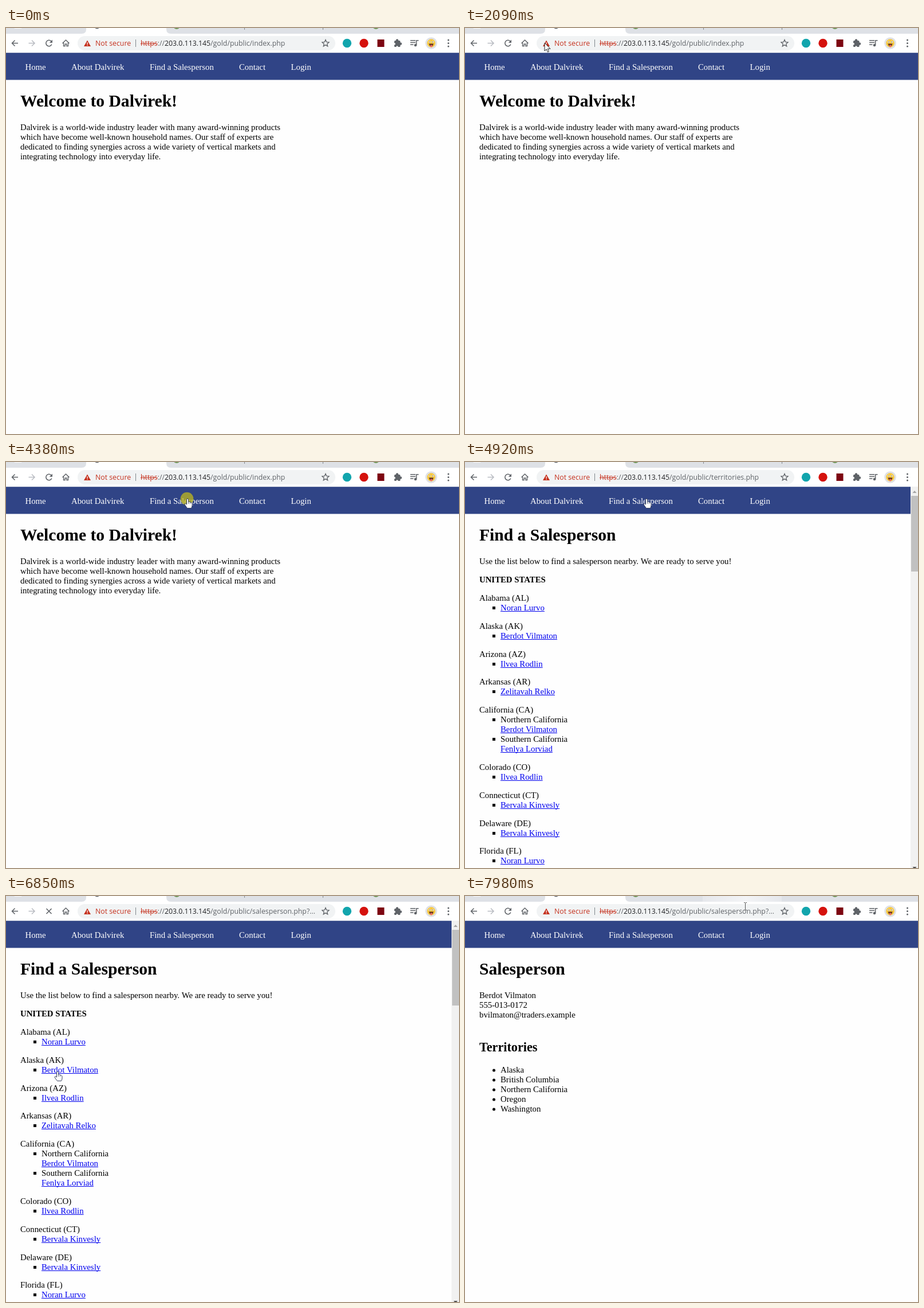
These frames come from a looping animation (791 px wide and 708 px high, 8 s). An HTML page with a canvas:

```html
<!DOCTYPE html>
<html lang="en">
<head>
<meta charset="utf-8">
<title>Salesperson pages</title>
<style>
html, body { margin: 0; width: 100%; height: 100%; overflow: hidden; background: #fefefe; }
canvas { display: block; width: 791px; height: 708px; }
</style>
</head>
<body>
<canvas id="stage" width="791" height="708"></canvas>
<script>
const c = document.getElementById('stage').getContext('2d');
const LOOP = 8000, W = 791, H = 708, EM = 14.8;
const SERIF = '"Liberation Serif", serif', SANS = '"Open Sans", sans-serif';
const GREY = '#5f6368', RED = '#c5321f', BLUE = '#0000ee';

const [noran, berdot, ilvea, zeli, fenlya, bervala] = [
  'Noran Lurvo', 'Berdot Vilmaton', 'Ilvea Rodlin',
  'Zelitavah Relko', 'Fenlya Lorviad', 'Bervala Kinvesly'];
const states = [
  ['Alabama (AL)', noran], ['Alaska (AK)', berdot], ['Arizona (AZ)', ilvea],
  ['Arkansas (AR)', zeli],
  ['California (CA)', ['Northern California', berdot], ['Southern California', fenlya]],
  ['Colorado (CO)', ilvea], ['Connecticut (CT)', bervala],
  ['Delaware (DE)', bervala], ['Florida (FL)', noran]];

// Pointer moves: start, end, step count, then [step, x, y] key points.
const moves = [
  [520, 660, 3, [[0, 770, 692], [1, 763, 691], [2, 800, 715]]],
  [1320, 2090, 12, [[0, 776, 690], [1, 600, 490], [2, 400, 290], [3, 253, 164],
    [5, 180, 96], [8, 148, 48], [11, 139, 26]]],
  [2160, 2570, 7, [[0, 260, 28], [2, 550, 46], [3, 467, 53], [4, 382, 67], [6, 317, 64]]],
  [5390, 5530, 3, [[0, 170, 130], [1, 12, 198], [2, -30, 215]]],
  [5730, 6250, 9, [[0, 30, 250], [3, 78, 282], [5, 91, 293], [8, 90, 306]]],
  [7300, 7980, 11, [[0, 104, 292], [4, 240, 176], [8, 444, 42], [9, 480, 8], [10, 489, 18]]]];

const during = (t, a, b) => t >= a && t < b;
const pageAt = t => t < 4920 ? 'home' : t < 6980 ? 'list' : 'person';

function text(s, x, y, size = EM, color = '#000', family = SERIF, weight = '') {
  c.font = `${weight} ${size}px ${family}`;
  c.fillStyle = color;
  c.fillText(s, x, y);
  return c.measureText(s).width;
}
function rect(x, y, w, h, color) {
  c.fillStyle = color;
  c.fillRect(x, y, w, h);
}
function disc(x, y, r, color) {
  c.fillStyle = color;
  c.beginPath();
  c.arc(x, y, r, 0, 7);
  c.fill();
}
function pill(x, y, w, h, r, color) {
  c.fillStyle = color;
  c.beginPath();
  c.roundRect(x, y, w, h, r);
  c.fill();
}
function shape(d, x, y, fill, stroke, width = 1.5) {
  const p = new Path2D(d);
  c.save();
  c.translate(x, y);
  if (fill) { c.fillStyle = fill; c.fill(p); }
  if (stroke) { c.strokeStyle = stroke; c.lineWidth = width; c.stroke(p); }
  c.restore();
}
function link(s, x, y, color = BLUE) {
  const w = text(s, x, y, EM, color);
  rect(x, Math.round(y) + 1, w, 1, color);
}
const heading = s => text(s, 25, 137, EM * 2, '#000', SERIF, 'bold');
const lines = (list, y) => list.forEach((s, i) => text(s, 25, y + i * 17));

function tabs(t) {
  rect(0, 0, W, 10, '#dee1e6');
  if (t >= 7880) {
    const g = c.createLinearGradient(415, 0, 553, 0);
    g.addColorStop(0, '#e6e8ec');
    g.addColorStop(0.55, '#f3f4f6');
    g.addColorStop(1, '#e6e8ec');
    rect(415, 0, 138, 10, g);
  }
  shape('M132 10Q140 10 140 2V0H280V2Q280 10 288 10Z', 0, 0, '#fff');
  pill(14, -4, 14, 5, 2, '#fafafa');
  disc(159, -4, 5.5, GREY);
  disc(298, -4, 6, '#6f9455');
  disc(646, -4, 6, '#6f9455');
  if (t < 7880) {
    rect(416, 0, 1, 3, '#80868b');
    rect(553, 0, 1, 3, '#80868b');
  }
}

function toolbar(t) {
  rect(0, 10, W, 33, '#fff');
  const arrow = 'M5.5 0H-5M0 -5L-5 0L0 5';
  shape(arrow, 15.5, 26.5, null, GREY);
  c.save();
  c.translate(45, 26.5);
  c.scale(-1, 1);
  shape(arrow, 0, 0, null, '#b9bcc2');
  c.restore();
  if (during(t, 4510, 4920) || during(t, 6710, 6980)) {
    shape('M-4.5 -4.5L4.5 4.5M4.5 -4.5L-4.5 4.5', 75, 26.5, null, GREY, 1.6);
  } else {
    shape('M4.8 2A5.2 5.2 0 1 1 3.6 -3.8', 75, 26.5, null, GREY, 1.6);
    shape('M6 -6V-.8H.8Z', 75, 26.5, GREY);
  }
  shape('M-6 .2L0 -5.5L6 .2M-4 -1V5H-1.4V1.5H1.4V5H4V-1', 104.5, 26.5, null, GREY, 1.4);

  pill(125, 14, 450, 25, 12.5, '#f1f3f4');
  shape('M0 -5.5L6 5H-6Z', 142, 27, RED);
  rect(141.4, 25, 1.3, 3.6, '#fff');
  rect(141.4, 29.5, 1.3, 1.3, '#fff');
  text('Not secure', 156, 31, 12.3, RED, SANS);
  rect(226, 20, 1, 13, '#80868b');
  let x = 235;
  const w = text('https', x, 31, 12.3, RED, SANS);
  rect(x, 27, w, 1, RED);
  x += w;
  x += text('://', x, 31, 12.3, GREY, SANS);
  x += text('203.0.113.145', x, 31, 12.3, '#202124', SANS);
  const file = t < 4780 ? 'index.php' : t < 6850 ? 'territories.php' : 'salesperson.php?...';
  text('/gold/public/' + file, x, 31, 12.3, GREY, SANS);
  shape('M0 -6L1.7 -2L6 -1.6L2.7 1.2L3.7 5.4L0 3.1L-3.7 5.4L-2.7 1.2L-6 -1.6L-1.7 -2Z',
    558, 26.5, null, GREY, 1.3);

  disc(595.5, 26.5, 7.7, '#12a5ad');
  disc(625, 26.5, 7.7, '#d5120d');
  rect(648.5, 20, 12, 13, '#7d0712');
  pill(678, 22, 10.5, 11, 1.5, GREY);
  disc(683, 21.5, 2.2, GREY);
  disc(689, 27.5, 2.2, GREY);
  disc(678.3, 27.7, 1.7, '#fff');
  disc(683, 33, 1.7, '#fff');
  for (const [i, len] of [9, 9, 5.5].entries()) rect(706, 21 + i * 3.6, len, 1.5, GREY);
  disc(715, 30, 2.3, GREY);
  shape('M716.6 30V21.7H720.5', 0, 0, null, GREY, 1.6);

  disc(742.5, 26.5, 10.3, '#dfe1e5');
  disc(742.5, 26.5, 7.2, '#f8c93e');
  disc(739.8, 24.3, 1.7, '#fff');
  disc(745.4, 24.3, 1.7, '#fff');
  disc(739.9, 24.4, 0.8, '#4a3020');
  disc(745.3, 24.4, 0.8, '#4a3020');
  shape('M-4 0H4Q3 5 0 5Q-3 5 -4 0Z', 742.5, 27.3, '#6a3a1c');
  pill(740.8, 29.5, 3.6, 4, 1.7, '#ed6a72');
  for (const y of [21, 26.5, 32]) disc(772.5, y, 1.5, GREY);
}

function nav(width) {
  rect(0, 43, width, 47.5, '#304486');
  rect(0, 43, width, 1, '#5f6f9f');
  [['Home', 33.5], ['About Dalvirek', 114], ['Find a Salesperson', 251],
    ['Contact', 407], ['Login', 497.5]].forEach(([s, x]) => text(s, x, 73, EM, '#fff'));
}

function home() {
  heading('Welcome to Dalvirek!');
  lines(['Dalvirek is a world-wide industry leader with many award-winning products',
    'which have become well-known household names. Our staff of experts are',
    'dedicated to finding synergies across a wide variety of vertical markets and',
    'integrating technology into everyday life.'], 178);
}

function list(t) {
  heading('Find a Salesperson');
  text('Use the list below to find a salesperson nearby. We are ready to serve you!', 25, 178);
  text('UNITED STATES', 25, 210, EM, '#000', SERIF, 'bold');
  let y = 242;
  for (const [state, ...items] of states) {
    text(state, 25, y);
    for (const item of items) {
      y += 17;
      rect(48, Math.round(y) - 7, 5, 5, '#000');
      let name = item;
      if (Array.isArray(item)) {
        text(item[0], 62, y);
        y += 17;
        name = item[1];
      }
      const pressed = state[3] === 's' && during(t, 6580, 6710);
      link(name, 62, y, pressed ? '#ff0000' : BLUE);
    }
    y += 31.8;
  }
  rect(778, 43, 13, H - 43, '#f1f1f1');
  rect(779, 59, 12, 132, '#c1c1c1');
  shape('M0 -2L3.5 2H-3.5Z', 785, 52, '#a3a3a3');
  shape('M0 2L3.5 -2H-3.5Z', 785, 708, '#505050');
}

function person() {
  heading('Salesperson');
  lines([berdot, '555-013-0172', 'bvilmaton@traders.example'], 178);
  text('Territories', 25, 271, EM * 1.5, '#000', SERIF, 'bold');
  ['Alaska', 'British Columbia', 'Northern California', 'Oregon', 'Washington']
    .forEach((s, i) => {
      disc(50.5, 304 + i * 17, 2.5, '#000');
      text(s, 62, 308 + i * 17);
    });
}

function pointerAt(t) {
  const move = moves.filter(m => t >= m[0]).pop();
  if (!move) return null;
  const [start, end, count, keys] = move;
  const gap = (end - start) / (count - 1);
  const step = Math.min(count - 1, Math.floor((t - start) / gap + 1e-6));
  const i = Math.max(1, keys.findIndex(k => k[0] >= step));
  const [a, b] = [keys[i - 1], keys[i]];
  const f = (step - a[0]) / (b[0] - a[0]);
  const x = a[1] + (b[1] - a[1]) * f, y = a[2] + (b[2] - a[2]) * f;
  return { x, y, kind: kindAt(x, y, pageAt(start + step * gap)) };
}

function kindAt(x, y, page) {
  if (y < 43) return y > 13 && x > 150 && x < 545 ? 'beam' : 'arrow';
  if (y < 91) {
    const spots = [[33, 70], [114, 207], [251, 363], [407, 453], [497, 533]];
    return y > 58 && y < 78 && spots.some(([a, b]) => x > a && x < b) ? 'hand' : 'arrow';
  }
  if (page === 'list') {
    if (x > 62 && x < 162 && y > 296 && y < 312) return 'hand';
    return x > 25 && x < 112 && y > 278 && y < 296 ? 'beam' : 'arrow';
  }
  if (page === 'home') return x > 25 && x < 480 && y > 160 && y < 235 ? 'beam' : 'arrow';
  return 'arrow';
}

function pointer(t) {
  const p = pointerAt(t);
  if (!p) return;
  for (const [at, x, y] of [[4380, 316, 64], [6580, 90, 307]]) {
    if (during(t, at, at + 130)) disc(x, y, 11.3, 'rgba(202,192,20,.7)');
  }
  const x = Math.round(p.x), y = Math.round(p.y);
  if (p.kind === 'beam') {
    shape('M-2 -6.5H0M1 -6.5H3M.5 -6V6M-2 6.5H0M1 6.5H3', x, y, null,
      y < 43 ? '#555' : '#111', 1);
  } else if (p.kind === 'hand') {
    shape('M-1.5 9V1.5Q-1.5 0 0 0Q1.5 0 1.5 1.5V5.5Q4 4.8 4.4 6.2Q6.6 5.8 6.8 7.4Q8 7.4 8 9V12Q8 14 6.5 16.5H-.5L-4.5 11Q-5.5 9.5 -4.3 8.7Q-3.2 8 -1.5 10Z',
      x, y, '#fff', '#26304f', 0.9);
    shape('M1.5 6V9M4.4 6.5V9.2', x, y, null, '#26304f', 0.7);
  } else {
    shape('M0 0V14L3.2 11L5.4 16L7.6 15L5.4 10.2H10Z', x, y, '#fff', '#111', 0.9);
  }
}

function draw(now) {
  const t = now % LOOP, page = pageAt(t);
  rect(0, 0, W, H, '#fefefe');
  tabs(t);
  toolbar(t);
  nav(page === 'list' ? 778 : W);
  ({ home, list, person })[page](t);
  pointer(t);
}

let begin;
function frame(now) {
  begin ??= now;
  draw(now - begin);
  requestAnimationFrame(frame);
}
requestAnimationFrame(frame);
</script>
</body>
</html>
```
